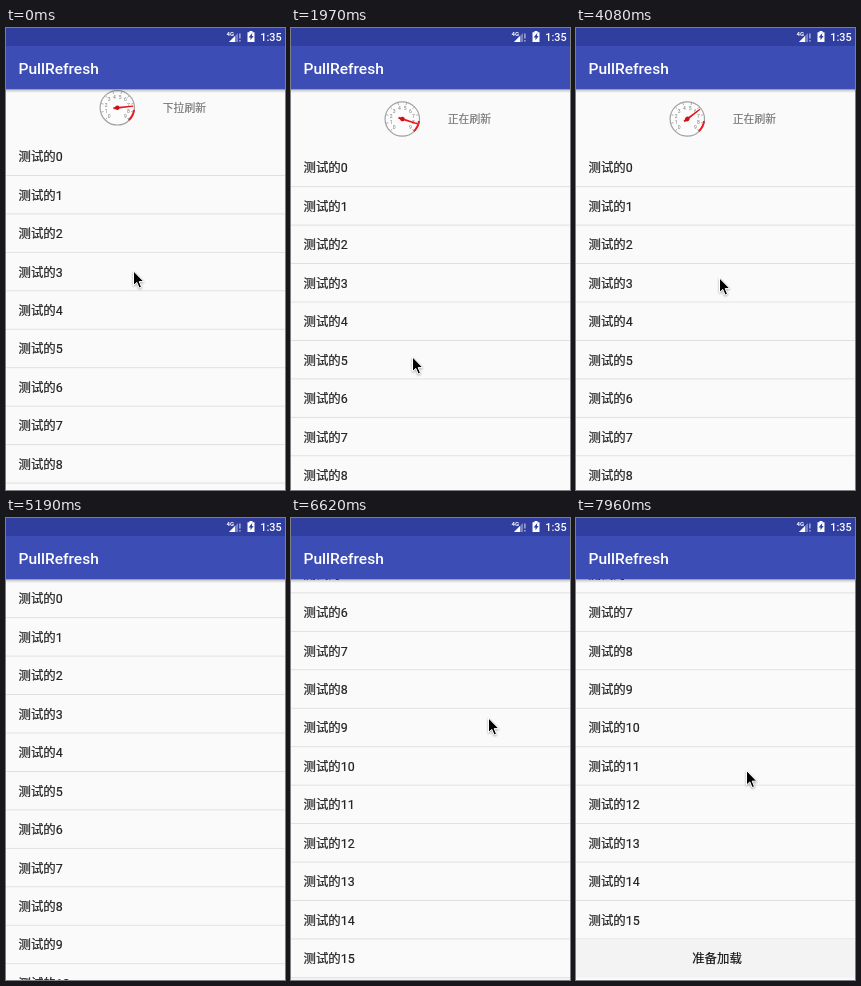
Write an HTML page that moves like this. It is 279 px wide and 462 px high and loops after 7.99 s.

```html
<!DOCTYPE html>
<html lang="zh-CN">
<head>
<meta charset="utf-8">
<title>PullRefresh</title>
<style>
  html, body { margin: 0; height: 100%; overflow: hidden; background: #fafafa; }
  svg { display: block; width: 100vw; height: 100vh; font-family: Roboto, "Noto Sans CJK SC", "Noto Sans CJK", sans-serif; }
  .row { font-size: 12.4px; fill: #212121; stroke: #212121; stroke-width: .2px; }
  .more { font-weight: 500; fill: #111; text-anchor: middle; }
  .hint { font-size: 10.85px; fill: #737373; stroke: #737373; stroke-width: .15px; }
  .digit { font-size: 5px; fill: #777; text-anchor: middle; }
</style>
</head>
<body>
<svg viewBox="0 0 279 462">
  <defs>
    <linearGradient id="shade" x2="0" y2="1">
      <stop offset="0" stop-opacity=".25"/>
      <stop offset="1" stop-opacity="0"/>
    </linearGradient>
  </defs>
  <rect width="279" height="462" fill="#fafafa"/>

  <g id="list">
    <g id="dial" transform="translate(111.3 -30)">
      <circle r="17.2" fill="#fcfcfc" stroke="#a2a2a2" stroke-width="1.2"/>
      <path d="M16.7 2A16.8 16.8 0 0 1 11.4 12.3" fill="none" stroke="#f0161d" stroke-width="2"/>
      <g id="scale"></g>
      <g id="needle" fill="#e8141a">
        <path d="M-4-1.1L16-.6V.6L-4 1.1Z"/>
        <circle r="2.3" fill="#c91217"/>
      </g>
    </g>
    <text id="hint" class="hint" x="156.7" y="-26"></text>
    <g id="rows"></g>
  </g>

  <rect y="61" width="279" height="4" fill="url(#shade)"/>
  <rect width="279" height="61.3" fill="#3c4db5"/>
  <rect width="279" height="18" fill="#303f9f"/>
  <text x="12.6" y="46" font-size="15.5" font-weight="500" fill="#fff">PullRefresh</text>
  <g fill="#fff">
    <text x="220.5" y="8" font-size="6" font-weight="700">4G</text>
    <path d="M223 14L232 5V14Z" opacity=".35"/>
    <path d="M223 14L229 8V14Z"/>
    <path d="M233.3 5.5h1.2v5h-1.2zM233.3 12h1.2v1.6h-1.2z" opacity=".7"/>
    <path d="M241.5 4.3h2V3h3v1.3h2V14h-7z"/>
    <path d="M246.3 5L242.6 9.6h1.9v2.6L247.6 8h-1.7z" fill="#303f9f"/>
    <text x="275.6" y="13" font-size="10.85" font-weight="500" text-anchor="end">1:35</text>
  </g>

  <path id="cursor" d="M0 0V14.5L3.3 11.4 5.6 17 8 16 5.7 10.6H10.3Z" stroke="#fff" style="filter:drop-shadow(0 1px 1px #0005)"/>
</svg>

<script>
const LOOP = 7990, TOP = 62, ROW = 38.45, HEADER = 59, COUNT = 16;
const FIRST_PULL = 47.8, PULL = 31, SCROLL = 217;
const RELEASE = 1430, SWING = 1696, SWING_PERIOD = 1856;
const el = id => document.getElementById(id);

// Progress 0..1 between two times, smooth at both ends
function ease(t, from, to) {
  const u = Math.min(1, Math.max(0, (t - from) / (to - from)));
  return u * u * (3 - 2 * u);
}

function pose(t) {
  const pull = ease(t, 20, 940);
  const settle = ease(t, RELEASE, 1730);
  const drift = ease(t, 2060, 3250);
  const close = ease(t, 4450, 4780);
  const leave = ease(t, 4680, 5190);
  const enter = ease(t, 5550, 5950);
  const scroll = ease(t, 6000, 6600);
  const lower = ease(t, 6700, 7250);
  const load = ease(t, 7300, 7940);

  const rest = FIRST_PULL + PULL - HEADER;
  const dragged = SCROLL * scroll + ROW * load;
  return {
    offset: FIRST_PULL + PULL * pull - rest * settle - HEADER * close - dragged,
    x: 127.5 - 6 * pull + 22 * drift + 57 * leave - 3 * scroll - 27 * lower,
    y: 243 + 86 * pull - 79 * drift + 222 * leave - 55 * enter + 91 * lower - dragged
  };
}

function buildRows() {
  let out = '';
  for (let i = 0; i < COUNT; i++) {
    const y = i * ROW;
    out += `<text class="row" x="12.5" y="${y + 23.4}">测试的${i}</text>
      <rect y="${y + 37.2}" width="279" height=".9" fill="#dedede"/>`;
  }
  const y = COUNT * ROW;
  return out + `<rect y="${y - .4}" width="279" height="${ROW}" fill="#f3f3f3"/>
    <text class="row more" x="141" y="${y + 23.4}">准备加载</text>`;
}

function buildScale() {
  let out = '';
  for (let i = 0; i < 10; i++) {
    const angle = (135 + i * 30) * Math.PI / 180;
    const x = Math.cos(angle), y = Math.sin(angle);
    out += `<path d="M${x * 14.3} ${y * 14.3}L${x * 16.6} ${y * 16.6}" stroke="#999" stroke-width=".8"/>
      <text class="digit" x="${x * 11.5}" y="${y * 11.5 + 1.8}">${i}</text>`;
  }
  return out;
}

function needleAngle(t, offset) {
  if (t < RELEASE) return 135 + 270 * Math.min(1, offset / HEADER);
  const phase = Math.max(0, t - SWING) / SWING_PERIOD;
  return -22.5 + 67.5 * Math.cos(phase * 2 * Math.PI);
}

function hintText(t, offset) {
  if (t >= RELEASE) return '正在刷新';
  return offset < HEADER ? '下拉刷新' : '放开刷新';
}

function draw(t) {
  const { offset, x, y } = pose(t);
  el('list').setAttribute('transform', `translate(0 ${TOP + offset})`);
  el('needle').setAttribute('transform', `rotate(${needleAngle(t, offset)})`);
  el('cursor').setAttribute('transform', `translate(${x} ${y})`);
  el('hint').textContent = hintText(t, offset);
}

el('rows').innerHTML = buildRows();
el('scale').innerHTML = buildScale();
const start = performance.now();
function tick() {
  draw((performance.now() - start) % LOOP);
  requestAnimationFrame(tick);
}
tick();
</script>
</body>
</html>
```
